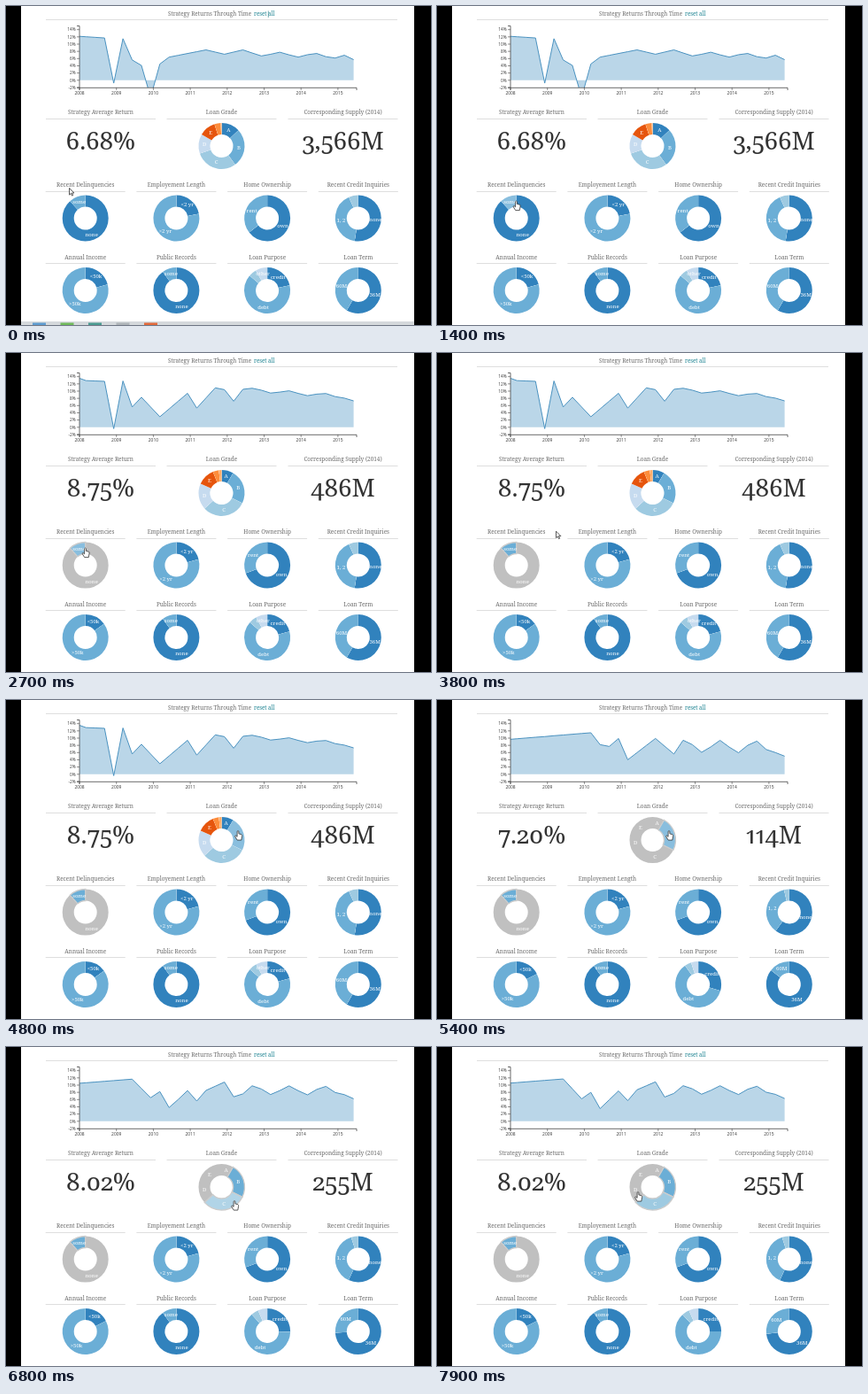
An HTML page with a canvas that plays this animation: 480x360 px, repeating every 8 s.

```html
<!DOCTYPE html>
<html lang="en">
<head>
<meta charset="utf-8">
<title>Loan strategy dashboard</title>
<style>
html, body { margin: 0; width: 100%; height: 100%; overflow: hidden; background: #000; }
canvas, svg { display: block; position: absolute; left: 0; top: 0; }
text { font: 300 28px "Noto Serif", serif; font-variant-numeric: oldstyle-nums proportional-nums; fill: #333; text-anchor: middle; }
</style>
</head>
<body>
<canvas id="stage" width="480" height="360"></canvas>
<svg width="480" height="360"><text id="average" x="107" y="162"/><text id="supply" x="380.5" y="162"/></svg>
<canvas id="top" width="480" height="360"></canvas>
<script>
const byId = id => document.getElementById(id);
const ctx = byId('stage').getContext('2d'), top2d = byId('top').getContext('2d');
const LOOP = 8000, FADE = 600, COUNT = 400;
const CLICKS = [1950, 4850, 6350];
const SERIF = '"Noto Serif", serif', SANS = '"Open Sans", sans-serif';
const COLORS = ['#3182bd', '#6baed6', '#9ecae1', '#c6dbef', '#e6550d', '#fd8d3c', '#fdae6b'];

const lerp = (a, b, k) => a + (b - a) * k;
const clamp = k => Math.max(0, Math.min(1, k));
const cubic = k => k < .5 ? 4 * k ** 3 : 1 - 4 * (1 - k) ** 3;
const percentY = p => 83.8 - p * 4.08;

// Quarterly returns: straight runs between turning points, then a yearly ripple
function series(turns, swing, crest) {
  const stops = Object.keys(turns).map(Number);
  return Array.from({ length: 31 }, (_, i) => {
    const b = stops.find(s => s >= i), a = stops[Math.max(0, stops.indexOf(b) - 1)];
    const base = a === b ? turns[a] : lerp(turns[a], turns[b], (i - a) / (b - a));
    const ripple = i > 18 && i < 30 ? swing * Math.cos((i - crest) * 2 * Math.PI / 3.8) : 0;
    return base + ripple;
  });
}

// One entry per filter state
const RETURNS = [
  series({ 0: 12.2, 3: 11.7, 4: -.8, 5: 11.5, 6: 5.6, 7: 4.1, 8: -4.7, 9: 4.5, 10: 6.4, 14: 8.4, 16: 7.2, 18: 8.4, 19: 7.4, 29: 6.6, 30: 5.7 }, .6, 22),
  series({ 0: 13.8, 1: 12.9, 3: 12.7, 4: -.4, 5: 12.8, 6: 5.6, 7: 8.3, 9: 2.9, 12: 9.4, 13: 5.3, 15: 10.9, 16: 10.4, 17: 7.2, 18: 10.5, 29: 8.5, 30: 7.3 }, .5, 23),
  series({ 0: 9.6, 9: 11.5, 10: 8.2, 11: 7.7, 12: 9.9, 13: 4, 16: 9.9, 18: 5.6, 19: 7.8, 29: 7.5, 30: 5 }, 1.7, 23),
  series({ 0: 10.5, 6: 11.7, 8: 6.2, 9: 8, 10: 3.5, 12: 8.4, 13: 5.7, 14: 8.7, 16: 10.9, 17: 6.7, 19: 8.7, 29: 8.5, 30: 6.3 }, 1.2, 23)
];
const AVERAGE = [[6.68], [8.75], [7.2], [8.02]];
const SUPPLY = [[3566], [486], [114], [255]];

// ends: inner slice boundaries in degrees per state, the last entry stays; picked: selected slices per state
const cell = (column, row, title, labels, ends, picked) =>
  ({ x: 89.7 + 102.7 * column, y: 239.5 + 81.5 * row, title, labels, ends, picked });
const pies = [
  { x: 243.5, y: 158, title: 'Loan Grade', labels: [...'ABCDEFG'],
    ends: [[47, 144, 251, 300, 342, 358], [30, 116, 228, 294, 338, 353]], picked: [[], [], [1], [1, 2]] },
  cell(0, 0, 'Recent Delinquencies', ['none', 'some'], [[318]], [[], [1], [1], [1]]),
  cell(1, 0, 'Employement Length', ['<2 yr', '>2 yr'], [[79], [75]]),
  cell(2, 0, 'Home Ownership', ['own', 'rent'], [[232], [250]]),
  cell(3, 0, 'Recent Credit Inquiries', ['none', '1, 2', ''], [[189, 336], [189, 336], [216, 347], [204, 342]]),
  cell(0, 1, 'Annual Income', ['<50k', '>50k'], [[75], [54], [63]]),
  cell(1, 1, 'Public Records', ['some', 'none'].reverse(), [[324]]),
  cell(2, 1, 'Loan Purpose', ['credit', 'debt', '', 'other'], [[77, 310, 330], [75, 311, 331], [106, 325, 342], [90, 317, 336]]),
  cell(3, 1, 'Loan Term', ['36M', '60M'], [[210], [210], [308], [264]])
];

// Pointer moves: start time, end time, x, y
const MOVES = [[0, 0, 71.5, 205.5], [300, 1200, 89.5, 220], [3500, 4400, 262, 147.5], [5600, 6100, 258, 173.5], [7200, 7800, 227, 163.5]];

const stateAt = t => CLICKS.filter(c => t >= c).length;

function blend(states, t, duration) {
  const s = stateAt(t), pick = i => states[Math.min(i, states.length - 1)];
  if (!s) return states[0];
  const k = cubic(clamp((t - CLICKS[s - 1]) / duration));
  return pick(s).map((v, i) => lerp(pick(s - 1)[i], v, k));
}

function pointerAt(t) {
  return MOVES.reduce(([px, py], [from, to, x, y]) => {
    if (t < from) return [px, py];
    const u = clamp((t - from) / (to - from || 1)), k = u * u * (3 - 2 * u);
    return [lerp(px, x, k), lerp(py, y, k)];
  }, MOVES[0].slice(2));
}

function text(str, x, y, size, color, align = 'center', font = SERIF, weight = 400) {
  ctx.font = `${weight} ${size}px ${font}`;
  ctx.fillStyle = color;
  ctx.textAlign = align;
  ctx.fillText(str, x, y);
}

function line(color, width, ...points) {
  ctx.beginPath();
  points.forEach(p => ctx.lineTo(...p));
  ctx.strokeStyle = color;
  ctx.lineWidth = width;
  ctx.stroke();
}

const rule = (x, y, width) => line('#dedede', 1, [x, y], [x + width, y]);

function heading(str, center, y, width) {
  text(str, center, y, 6.4, '#6a6a6a');
  rule(center - width / 2, Math.floor(y + 5.3) + .5, width);
}

function drawChart(t) {
  const points = blend(RETURNS, t, FADE).map((p, i) => [80 + 10.42 * i, percentY(p)]);
  ctx.save();
  ctx.beginPath();
  ctx.rect(83, 20, 314, 72);
  ctx.clip();
  ctx.beginPath();
  ctx.moveTo(80, 83.8);
  points.forEach(p => ctx.lineTo(...p));
  ctx.lineTo(points[30][0], 83.8);
  ctx.fillStyle = '#bad6e8';
  ctx.fill();
  line('#4a92c0', 1, ...points);
  ctx.restore();

  line('#444', .8, [80, 22.5], [83, 22.5], [83, 92.3], [80, 92.3]);
  line('#444', .8, [83, 95], [83, 92.3], [396, 92.3], [396, 95]);
  for (let p = -2; p <= 14; p += 2) {
    const y = percentY(p);
    line('#444', .6, [80, y], [83, y]);
    text(p + '%', 78.5, y + 1.7, 4.7, '#333', 'right', SANS);
  }
  for (let i = 0; i < 8; i++) {
    const x = 83 + i * 41.7;
    line('#444', .6, [x, 92], [x, 95]);
    text(2008 + i, x, 99.8, 4.9, '#333', 'center', SANS);
  }
}

function drawPie(pie, t, [px, py]) {
  const { x, y, labels } = pie, r = 26, hole = 13;
  const bounds = [0, ...blend(pie.ends, t, FADE), 360];
  const picked = pie.picked ? pie.picked[stateAt(t)] : [];
  const dist = Math.hypot(px - x, py - y), over = dist > hole && dist < r;
  const aim = (Math.atan2(px - x, y - py) * 180 / Math.PI + 360) % 360;
  const rad = d => (d - 90) * Math.PI / 180;

  if (picked.length) {
    ctx.beginPath();
    ctx.arc(x, y, (r + hole) / 2, 0, 7);
    ctx.strokeStyle = '#c0c0c0';
    ctx.lineWidth = r - hole;
    ctx.stroke();
  }
  labels.forEach((_, i) => {
    const from = bounds[i], to = bounds[i + 1], chosen = picked.includes(i);
    if (picked.length && !chosen) return;
    ctx.beginPath();
    ctx.arc(x, y, r, rad(from), rad(to));
    ctx.arc(x, y, hole, rad(to), rad(from), true);
    ctx.closePath();
    ctx.fillStyle = '#fff';
    ctx.fill();
    ctx.globalAlpha = over && aim >= from && aim < to ? .8 : 1;
    ctx.fillStyle = COLORS[i];
    ctx.fill();
    ctx.globalAlpha = 1;
    if (chosen) {
      ctx.strokeStyle = '#ccc';
      ctx.lineWidth = 1.3;
      ctx.stroke();
    }
  });
  labels.forEach((label, i) => {
    if (bounds[i + 1] - bounds[i] < 28.6) return;
    const a = rad((bounds[i] + bounds[i + 1]) / 2);
    text(label, x + 19.5 * Math.cos(a), y + 19.5 * Math.sin(a) + 1.8, 6, '#fff');
  });
  return over;
}

const ARROW = new Path2D('M0 0V7.6L1.8 6L3 8.6L4.2 8.1L3 5.5H5.4Z');
const HAND = new Path2D('M-.9 .7Q0-.6 .9 .7V3.4L3.9 4.2Q4.8 4.6 4.6 6L3.8 10.6H-.8L-3.2 6.8Q-3.6 5.4-2.4 5.6L-.9 6.8Z');

function drawPointer([x, y], hand) {
  const shape = hand ? HAND : ARROW;
  top2d.setTransform(1, 0, 0, 1, 0, 0);
  top2d.clearRect(0, 0, 480, 360);
  top2d.translate(x, y);
  top2d.fillStyle = '#fff';
  top2d.strokeStyle = '#333';
  top2d.lineWidth = .8;
  top2d.fill(shape);
  top2d.stroke(shape);
}

function drawTaskbar() {
  const box = (color, x, y, w) => { ctx.fillStyle = color; ctx.fillRect(x, y, w, 360 - y); };
  box('#d5d9dc', 17, 356, 444);
  ['#5d9bd0', '#6fb95a', '#4a9a90', '#aeb4b8', '#e2693a'].forEach((color, i) => box(color, 30 + 31.5 * i, 357.5, 15));
}

function draw(t) {
  ctx.fillStyle = '#000';
  ctx.fillRect(0, 0, 480, 360);
  ctx.fillStyle = '#fff';
  ctx.fillRect(17, 0, 444, 360);

  text('Strategy Returns Through Time', 183, 10.8, 6.3, '#6a6a6a', 'left');
  text('reset all', 280, 10.8, 6.2, '#18808f', 'left', SERIF, 500);
  if (t < 500) line('#3a8c94', .7, [296.3, 5.5], [296.3, 13]);
  rule(45, 15.5, 397);
  drawChart(t);

  heading('Strategy Average Return', 107, 122.3, 124);
  heading('Corresponding Supply (2014)', 380.5, 122.3, 124);
  byId('average').textContent = blend(AVERAGE, t, COUNT)[0].toFixed(2) + '%';
  byId('supply').textContent = Math.round(blend(SUPPLY, t, COUNT)[0]).toLocaleString('en-US') + 'M';

  const pointer = pointerAt(t);
  let hand = false;
  pies.forEach((pie, i) => {
    heading(pie.title, pie.x, i ? pie.y - 35.5 : 122.3, i ? 90 : 124);
    hand = drawPie(pie, t, pointer) || hand;
  });
  if (t < 1400) drawTaskbar();
  drawPointer(pointer, hand);
}

function tick() {
  draw(performance.now() % LOOP);
  requestAnimationFrame(tick);
}
tick();
</script>
</body>
</html>
```
